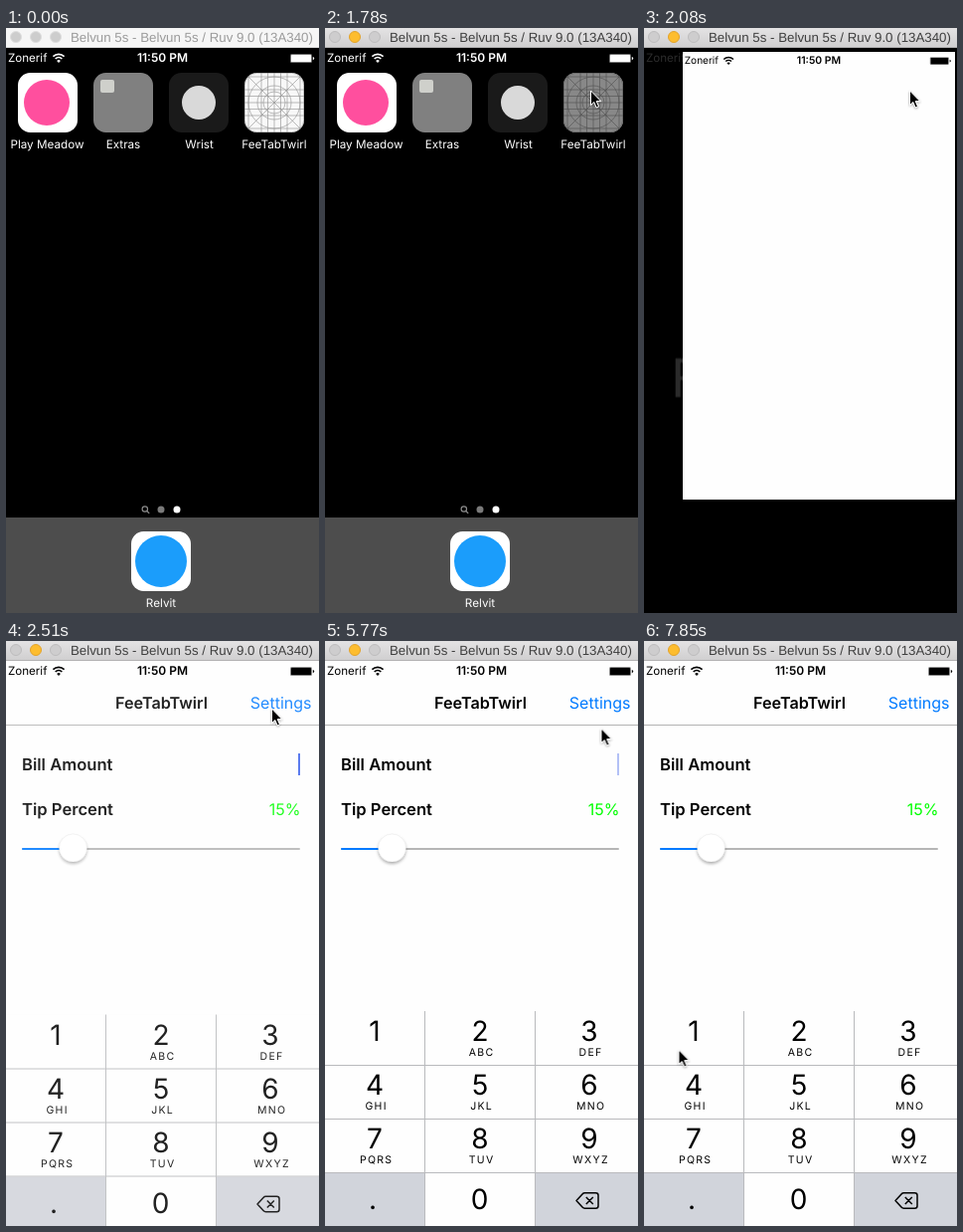
Recreate the animation shown at these times as an HTML page. Size 315 by 588 pixels, loop 8 s.

```html
<!DOCTYPE html>
<html lang="en">
<head>
<meta charset="utf-8">
<title>Simulator</title>
<style>
  html, body { margin: 0; width: 100%; height: 100%; overflow: hidden; background: #000; }
  svg { display: block; width: 315px; height: 588px; font-family: Inter, "Noto Sans", sans-serif; text-rendering: geometricPrecision; }
  .mid { text-anchor: middle; }
  .end { text-anchor: end; }
  .bold { font-weight: 600; }
  #home, #launch, #keys, #cursor { transform-origin: 0 0; transform-box: view-box; }
  #bar text { font: 13.3px "Liberation Sans", Arial, sans-serif; }
</style>
</head>
<body>
<svg viewBox="0 0 315 588" xmlns="http://www.w3.org/2000/svg">
  <defs>
    <linearGradient id="chrome" x2="0" y2="1">
      <stop stop-color="#e4e3e4"/><stop offset="1" stop-color="#cfcecf"/>
    </linearGradient>
    <filter id="soft" x="-50%" y="-50%" width="200%" height="200%">
      <feDropShadow dx="0" dy="2" stdDeviation="1.6" flood-opacity=".3"/>
    </filter>
    <filter id="tiny" x="-50%" y="-50%" width="200%" height="200%">
      <feDropShadow dx="0" dy="1" stdDeviation=".8" flood-opacity=".35"/>
    </filter>
    <clipPath id="tile"><rect width="60" height="60" rx="12.5"/></clipPath>
    <g id="status" fill="currentColor">
      <text x="2" y="34.3" font-size="11.6">Zonerif</text>
      <g fill="none" stroke="currentColor" stroke-width="1.7">
        <path d="M47.4 28.6a8 8 0 0 1 11.2 0M49.7 31a4.7 4.7 0 0 1 6.6 0"/>
      </g>
      <path d="M53 35l-1.9-2.1a2.7 2.7 0 0 1 3.8 0z"/>
      <text class="mid bold" x="157.5" y="34.3" font-size="12">11:50 PM</text>
      <rect x="286" y="26" width="22" height="9" rx="1.6" opacity=".45"/>
      <rect x="287" y="27" width="20" height="7" rx=".6"/>
      <path d="M308.8 29v3.2q1.4-.4 1.4-1.6t-1.4-1.6z"/>
    </g>
  </defs>

  <rect width="315" height="588"/>

  <g id="home" fill="#fff" font-size="11.7">
    <rect x="12" y="45" width="60" height="60" rx="12.5"/>
    <circle cx="41" cy="75" r="23" fill="#ff4f9e"/>
    <rect x="88" y="45" width="60" height="60" rx="12.5" fill="#808080"/>
    <rect x="95" y="52" width="14" height="13" rx="2" fill="#cfd0cb"/>
    <rect x="164" y="45" width="60" height="60" rx="12.5" fill="#1a1a1a"/>
    <circle cx="194" cy="75" r="17" fill="#d9d9d9"/>
    <g transform="translate(240 45)" clip-path="url(#tile)">
      <rect width="60" height="60" fill="#f8f8f8"/>
      <g id="guides" fill="none" stroke="#8d8d8d" stroke-width=".6"></g>
      <rect id="press" width="60" height="60" fill="#000" opacity="0"/>
    </g>
    <g class="mid">
      <text x="41.5" y="121">Play Meadow</text>
      <text x="118" y="121">Extras</text>
      <text x="194.5" y="121">Wrist</text>
      <text x="270" y="121">FeeTabTwirl</text>
    </g>
    <g fill="none" stroke="#8a8a8a" stroke-width="1.2">
      <circle cx="139.8" cy="483.5" r="2.7"/><path d="M141.8 485.5l2.4 2.4"/>
    </g>
    <circle cx="156" cy="484" r="3.5" fill="#7a7a7a"/>
    <circle cx="172" cy="484" r="3.5"/>
    <rect y="492" width="315" height="96" fill="#4d4d4d"/>
    <rect x="126" y="506" width="60" height="60" rx="12.5"/>
    <circle cx="156" cy="536" r="26" fill="#1b9dfb"/>
    <text class="mid" x="156" y="582">Relvit</text>
  </g>
  <use id="homeStatus" href="#status" color="#fff"/>

  <g id="launch" opacity="0">
    <rect id="sheet" width="315" height="568" fill="#fefefe"/>
    <use href="#status" y="-20" color="#000"/>
  </g>

  <g id="view" opacity="0">
    <path d="M0 84.5h315" stroke="#b4b4b4"/>
    <text class="mid bold" x="156.5" y="68" font-size="16.2">FeeTabTwirl</text>
    <text class="end" x="307.5" y="68" font-size="16" fill="#007aff">Settings</text>
    <text class="bold" x="16" y="130.3" font-size="16.6">Bill Amount</text>
    <text class="bold" x="16" y="174.5" font-size="16.6">Tip Percent</text>
    <text class="end" x="296.5" y="174.5" font-size="16" fill="#0f0">15%</text>
    <rect id="caret" x="294" y="113" width="2" height="22" fill="#4468ec"/>
    <rect x="16" y="208" width="280" height="2" rx="1" fill="#b6b6b6"/>
    <rect x="16" y="208" width="50" height="2" rx="1" fill="#007aff"/>
    <circle cx="67.5" cy="208" r="14" fill="#fff" stroke="#000" stroke-opacity=".1" stroke-width=".5" filter="url(#soft)"/>
    <g id="keys"></g>
  </g>

  <g id="bar">
    <g id="barIdle">
      <rect width="315" height="20" fill="#f6f6f6"/>
      <g fill="#cdcdcd" stroke="#dedede"><circle cx="10" cy="9" r="5.5"/><circle cx="30" cy="9" r="5.5"/><circle cx="50" cy="9" r="5.5"/></g>
      <path d="M0 19.5h315" stroke="#dcdcdc"/>
      <text x="65" y="14" fill="#9b9b9b">Belvun 5s - Belvun 5s / Ruv 9.0 (13A340)</text>
    </g>
    <g id="barLive" opacity="0">
      <rect width="315" height="20" fill="url(#chrome)"/>
      <g fill="#cecdce" stroke="#bdbcbd"><circle cx="10" cy="9" r="5.5"/><circle cx="50" cy="9" r="5.5"/></g>
      <circle cx="30" cy="9" r="5.5" fill="#fdbd2f" stroke="#e3a32a"/>
      <path d="M0 19.5h315" stroke="#b3b2b3"/>
      <text x="65" y="14" fill="#3f3f3f">Belvun 5s - Belvun 5s / Ruv 9.0 (13A340)</text>
    </g>
  </g>

  <path id="cursor" opacity="0" d="M.5 0v14.6l3.3-3.1 2.3 5.4 2.4-1-2.3-5.3h4.6z" stroke="#fff" stroke-width="1" filter="url(#tiny)"/>
</svg>
<script>
const LOOP = 8000;
const $ = id => document.getElementById(id);

// Placeholder icon guides
const lines = [4, 17, 23.5, 30, 36.5, 43, 56].map(p => `M${p} 0v60M0 ${p}h60`).join('');
$('guides').innerHTML = `<path d="${lines}M0 0l60 60M60 0L0 60"/>` +
  [26, 17, 11].map(r => `<circle cx="30" cy="30" r="${r}"/>`).join('') +
  '<rect x=".3" y=".3" width="59.4" height="59.4" rx="12.2"/>';

// Number pad
const cols = [50, 156, 266];
const letters = ['', 'ABC', 'DEF', 'GHI', 'JKL', 'MNO', 'PQRS', 'TUV', 'WXYZ'];
const digit = (s, x, y) => `<text class="mid" x="${x}" y="${y}" font-size="28">${s}</text>`;
$('keys').innerHTML = `
  <rect y="372" width="315" height="220" fill="#fefefe"/>
  <path d="M0 535h100v57H0zM212 535h103v57H212z" fill="#d1d4db"/>
  <path d="M100.5 372v220M211.5 372v220M0 426.5h315M0 480.5h315M0 534.5h315" stroke="#b9babd"/>` +
  letters.map((s, i) => {
    const x = cols[i % 3], y = 402 + 54 * Math.floor(i / 3);
    return digit(i + 1, x, y) +
      `<text class="mid" x="${x + 1.6}" y="${y + 15}" font-size="10.5" letter-spacing="1.3">${s}</text>`;
  }).join('') + digit('.', 48, 571) + digit(0, 155.5, 571) + `
  <path d="M253 562.5l6-6.6q1-1.1 2.5-1.1h11q2.5 0 2.5 2.5v10.4q0 2.5-2.5 2.5h-11q-1.5 0-2.5-1.1zM262.8 559l7 7m0-7l-7 7"
    fill="none" stroke="#000" stroke-width="1.5" stroke-linejoin="round"/>`;

// Hard steps: each row is [time, properties]
function play(id, rows) {
  const frames = rows.map(([t, props]) => ({ offset: t / LOOP, easing: 'step-end', ...props }));
  frames.push({ ...frames[frames.length - 1], offset: 1 });
  $(id).animate(frames, { duration: LOOP, iterations: Infinity });
}
const fade = (id, rows) => play(id, rows.map(([t, opacity]) => [t, { opacity }]));
const move = (x, y, k = 1) => ({ transform: `translate(${x}px, ${y}px) scale(${k})` });

fade('barIdle', [[0, 1], [450, 0]]);
fade('barLive', [[0, 0], [450, 1]]);
fade('press', [[0, 0], [1780, .45]]);

// App opening: time, x, y, width, height, home opacity, sheet opacity
const zoom = [
  [0, 240, 45, 60, 60, 1, 0],
  [1930, 156, 36, 149, 200, .7, .6],
  [2080, 39, 24, 274, 450, .17, 1],
  [2220, 3, 20.5, 311.5, 555, 0, 1],
  [2370, 0, 20, 315, 568, 0, 1]
];
play('home', zoom.map(([t, x, y, w, h, opacity]) =>
  [t, { ...move(x - 4 * w, y - .75 * w, w / 60), opacity }]));
play('launch', zoom.map(([t, x, y, w, h, o, opacity]) => [t, { ...move(x, y, w / 315), opacity }]));
play('sheet', zoom.map(([t, x, y, w, h]) => [t, { height: h * 315 / w + 'px' }]));
fade('homeStatus', [[0, 1], [1930, .6], [2080, .17], [2220, 0]]);
fade('view', [[0, 0], [2370, .35], [2510, .87], [2660, .97], [2810, 1]]);
play('keys', [[0, move(0, 216)], [2370, move(0, 28)], [2510, move(0, 3.5)], [2660, move(0, 0)]]);

fade('caret', [
  [0, 1], [3110, .4], [3250, 0], [3700, 1], [4290, 0], [4730, .4], [4880, 1], [5180, .4], [5320, 0],
  [5770, .4], [5920, 1], [6220, .4], [6370, 0], [6810, .4], [6950, 1], [7260, .4], [7400, 0]
]);

fade('cursor', [[0, 0], [900, 1]]);
play('cursor', [
  [0, 282, 1], [1050, 276, 30], [1190, 269, 55], [1340, 267, 63],
  [2370, 267, 65], [2510, 267, 68], [2660, 267, 76], [2810, 268, 84],
  [2960, 270, 85], [3110, 272, 86], [3400, 274, 87], [3700, 276.5, 88], [3850, 277.5, 88],
  [6510, 277, 90], [6660, 276, 95], [6810, 272, 112], [6950, 263, 150], [7100, 248, 200],
  [7260, 226, 256], [7400, 140, 360], [7550, 40, 438], [7700, 2, 424], [7850, 34.5, 411]
].map(([t, x, y]) => [t, move(x, y)]));
</script>
</body>
</html>
```
